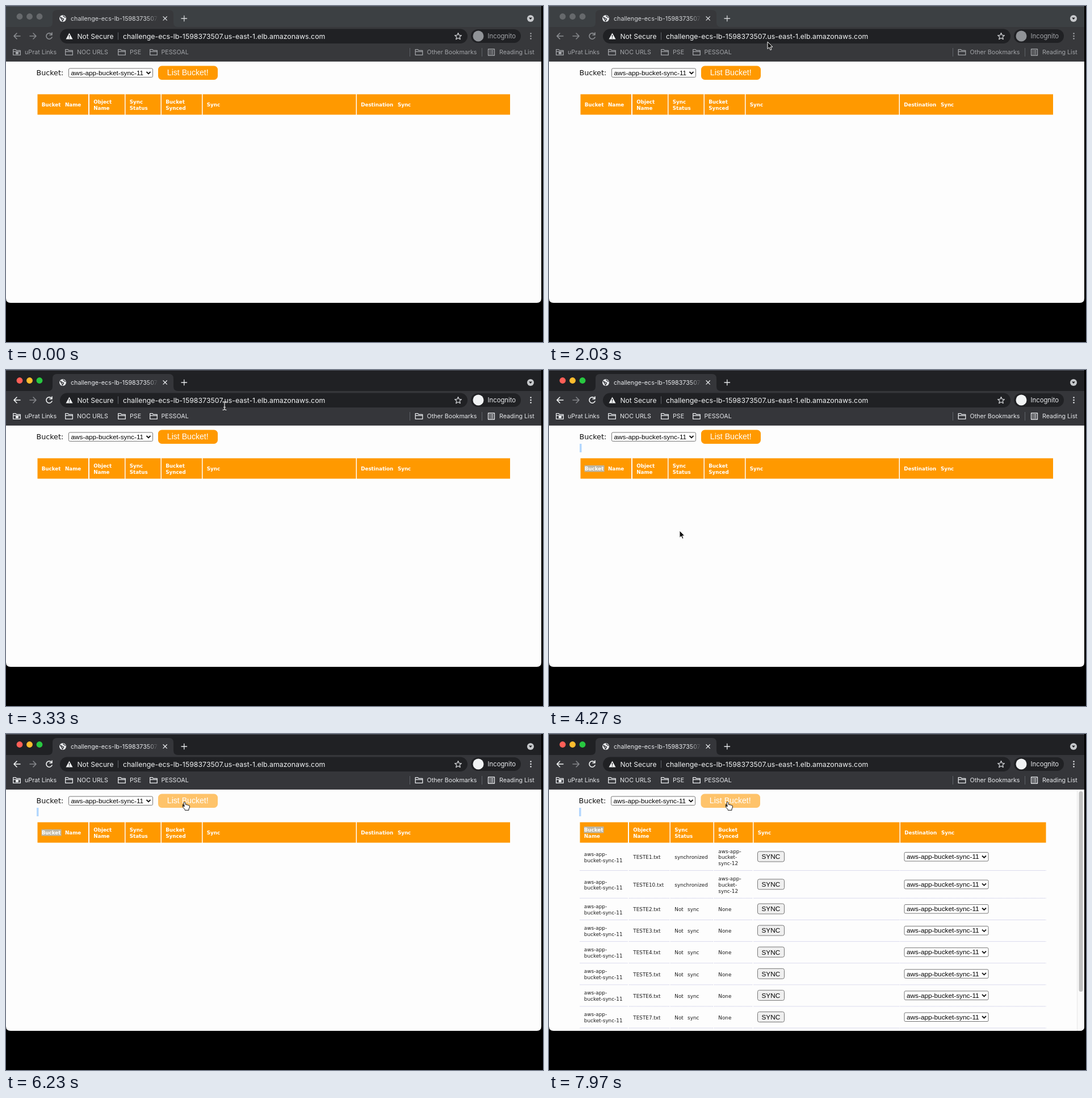
Recreate the animation shown at these times as an HTML page. Size 946 by 592 pixels, loop 8 s.

```html
<!DOCTYPE html>
<html lang="en">
<head>
<meta charset="utf-8">
<title>Bucket list</title>
<style>
  html, body { margin: 0; width: 100%; height: 100%; overflow: hidden; background: #000; }
  svg { display: block; width: 946px; height: 592px; }
  text { white-space: pre; }
  #browser { --frame: #202124; --bar: #35363a; --ink: #f1f3f4; --soft: #e8eaed; --back: #f1f3f4;
    --red: #ff5f57; --yellow: #febc2e; --green: #28c840; --badge: #f1f3f4; --title: #e8eaed; }
  #browser.inactive { --frame: #3c4043; --bar: #37383b; --soft: #a2a4a8; --back: #8c8e92;
    --red: #66696c; --yellow: #66696c; --green: #66696c; --badge: #909397; --title: #d4d6d9; }
  .ui { font-family: Inter, sans-serif; font-size: 10.7px; fill: var(--soft); }
  .url { font-size: 12.35px; fill: var(--ink); }
  .line { fill: none; stroke: var(--soft); stroke-width: 1.3; stroke-linecap: round; stroke-linejoin: round; }
  .label { font: 12.7px "DejaVu Sans", sans-serif; fill: #111; }
  .head { font: bold 8.75px "DejaVu Sans", sans-serif; fill: #fff; word-spacing: 4.5px; }
  .cell { font: 8.85px "DejaVu Sans", sans-serif; fill: #1c1c1c; word-spacing: 4.5px; }
  .form { font: 11.8px "Liberation Sans", Arial, sans-serif; fill: #000; }
  .button { font: 14.1px "Liberation Sans", Arial, sans-serif; fill: #fff; }
</style>
</head>
<body>
<svg viewBox="0 0 946 592">
  <defs>
    <clipPath id="window"><path d="M0 0H943V515Q943 523 935 523H8Q0 523 0 515Z"/></clipPath>
    <linearGradient id="fade" gradientUnits="userSpaceOnUse" x1="248" x2="268" y1="0" y2="0">
      <stop stop-color="#fff"/><stop offset="1" stop-color="#000"/>
    </linearGradient>
    <mask id="titleFade"><rect x="110" y="10" width="158" height="24" fill="url(#fade)"/></mask>
    <g id="folder"><path class="line" d="M.7 1.2H5l1.6 1.7h6.7v8H.7ZM.7 4.9h12.6"/></g>
  </defs>
  <rect width="946" height="592"/>
  <g clip-path="url(#window)">
    <rect width="943" height="523" fill="#fdfdfd"/>
    <g id="pages"></g>
    <g id="browser" class="inactive">
      <rect width="943" height="98" style="fill:var(--frame)"/>
      <rect width="943" height="1" fill="#50545f"/>
      <path d="M0 37H74Q82 37 82 29V15Q82 7 90 7H287Q295 7 295 15V29Q295 37 303 37H943V98H0Z" style="fill:var(--bar)"/>
      <rect y="97" width="943" height="1" fill="#48494d"/>
      <circle cx="24" cy="18.5" r="5.4" style="fill:var(--red)"/>
      <circle cx="41.5" cy="18.5" r="5.4" style="fill:var(--yellow)"/>
      <circle cx="59" cy="18.5" r="5.4" style="fill:var(--green)"/>
      <circle cx="100" cy="22" r="6" fill="#e8eaed"/>
      <path d="M95.5 19.5l4 2.5 2 1-2 3.5-1.5-3zM100.5 17l2 2 2.5 1.5" fill="none" stroke="#35363a" stroke-width="1.4"/>
      <text class="ui" x="114" y="26" mask="url(#titleFade)" style="fill:var(--title)">challenge-ecs-lb-1598373507.us</text>
      <path class="line" d="M277 18.7l6.4 6.4m0-6.4l-6.4 6.4M309 22h9.6m-4.8-4.8v9.6" style="stroke:var(--title)"/>
      <circle cx="924" cy="22" r="6" fill="#c6c8cb"/>
      <path d="M921 20.5h6l-3 3.5z" fill="#202124"/>

      <path class="line" d="M25 53H14m5-5l-5 5 5 5" style="stroke:var(--back);stroke-width:1.6"/>
      <path class="line" d="M42 53h11m-5-5l5 5-5 5" style="stroke:#85878b;stroke-width:1.6"/>
      <path class="line" d="M80.5 50.2A5.2 5.2 0 1 0 81 55M81 47v4h-4" style="stroke:var(--back);stroke-width:1.6"/>
      <rect x="95" y="40.5" width="718" height="25.5" rx="12.7" fill="#202124"/>
      <path d="M111.500 47.500l6 11h-12z" fill="#f1f3f4"/>
      <path d="M111.500 51v3.500m0 1.200v1.300" stroke="#202124" stroke-width="1.300"/>
      <text class="ui url" x="125.500" y="57.500" style="font-size:12.100px">Not Secure</text>
      <path d="M197.500 46.500v13" stroke="#5f6368"/>
      <text class="ui url" x="206" y="57.500">challenge-ecs-lb-1598373507.us-east-1.elb.amazonaws.com</text>
      <path class="line" d="M796.500 47.500l1.700 3.900 4.200.4-3.200 2.800 1 4.100-3.700-2.200-3.700 2.200 1-4.100-3.200-2.800 4.200-.4z" style="stroke:#d0d2d5"/>
      <rect x="819" y="41" width="88" height="24" rx="12" fill="#202124"/>
      <circle cx="832" cy="53" r="9.500" style="fill:var(--badge)"/>
      <text class="ui" x="848.500" y="57.300" style="font-size:11.300px">Incognito</text>
      <path d="M924.500 48.500v.01m0 4.500v.01m0 4.500v.01" stroke-width="2.600" stroke-linecap="round" style="stroke:var(--soft)"/>
      <g id="bookmarks"></g>
      <path d="M711.500 74v15M838.500 74v15" stroke="#5f6368"/>
      <path class="line" d="M849.500 76h11v11h-11zM852 79h1m2 0h3m-6 2.700h1m2 0h3m-6 2.700h1m2 0h3"/>
      <text class="ui" x="869" y="85">Reading List</text>
    </g>
  </g>
  <g id="pointer">
    <path id="arrow" d="M0 0V12.500L2.900 9.900 4.900 14.500 7 13.600 5.100 9.100H9Z" fill="#111" stroke="#fff" stroke-linejoin="round"/>
    <path id="beam" d="M-3.500-7.500Q0-7.500 0-5V5Q0 7.500-3.500 7.500M3.500-7.500Q0-7.500 0-5V5Q0 7.500 3.500 7.500M-2 2.500H2" fill="none" stroke="#e4e4e4" stroke-width="1.200"/>
    <path id="hand" d="M-1.500 1.200Q0-.8 1.400 1.200L2 5Q3.500 4.200 4.300 5.500 6 4.800 6.700 6.300 8.600 5.800 8.900 7.800L8.700 10.500 7.500 12.500V14.800H.8L.3 13-3 9.200Q-4-.2-.5 8.300-4.200 6.800-2.700 6.600L-.3 8Z" fill="#fff" stroke="#111" stroke-linejoin="round"/>
  </g>
</svg>
<script>
const LOOP = 8000, FOCUS = 2900, SELECT = 4220, HOVER = 4680, LISTED = 7720;
const ORANGE = '#ff9900', BUCKET = 'aws-app-bucket-sync-11';
const $ = id => document.getElementById(id);

const text = (cls, x, y, content) => `<text class="${cls}" x="${x}" y="${y}">${content}</text>`;
const rect = (x, y, w, h, fill, extra = '') =>
  `<rect x="${x}" y="${y}" width="${w}" height="${h}" fill="${fill}" ${extra}/>`;
const lines = (cls, x, centre, content) => content.split('|').map((part, i, all) =>
  text(cls, x, centre + 3.2 + (i - (all.length - 1) / 2) * 10.7, part)).join('');

const dropdown = (x, y) =>
  rect(x + .5, y + .5, 148, 15.5, '#fff', 'rx="2" stroke="#767676"') +
  text('form', x + 4.5, y + 12.2, BUCKET) +
  `<path d="M${x + 137.5} ${y + 6.5}l3.500 3.500 3.500-3.500" fill="none" stroke="#111" stroke-width="1.800"/>`;

const syncButton = y =>
  rect(367.5, y - 9.5, 47, 18, '#efefef', 'rx="3" stroke="#767676"') +
  text('form', 374.5, y + 3.8, 'SYNC');

// Each column is [left, right, heading].
function page(id, shift, columns) {
  const selection = rect(54 + shift, 130, 3.5, 15, '#b3d7fe') +
    rect(columns[0][0] + 7, columns[0][2].includes('|') ? 163 : 168, 35, 11.5, '#bdb6a4');
  return `<g id="${id}">` + text('label', 53.5 + shift, 122, 'Bucket:') +
    dropdown(110 + shift, 109.5) +
    '<g class="list">' + rect(268 + shift / 2, 105.5, 105 + shift / 2, 24.5, ORANGE, 'rx="6.500"') + '</g>' +
    text('button', 283.8 + shift, 122.3, 'List Bucket!') +
    columns.map(([left, right]) => rect(left, 155.5, right - left, 36, ORANGE)).join('') +
    `<g class="selection">${selection}</g>` +
    columns.map(([left, , title]) => lines('head', left + 7.2, 174, title)).join('');
}

function row(index, columns) {
  const synced = index < 2;
  const centre = synced ? 217 + index * 48.8 : 309 + (index - 2) * 38.1;
  const bottom = centre + (synced ? 23.5 : 18.5);
  const name = `TESTE${[1, 10, 2, 3, 4, 5, 6, 7][index]}.txt`;
  const values = ['aws-app-|bucket-sync-11', name, synced ? 'synchronized' : 'Not sync',
    synced ? 'aws-app-|bucket-|sync-12' : 'None'];
  return values.map((value, i) => lines('cell', columns[i][0] + 7.3, centre, value)).join('') +
    syncButton(centre - .5) + dropdown(625.5, centre - 9) +
    columns.map(([left, right]) =>
      `<path d="M${left} ${bottom}H${right}" stroke="#b9b9de" stroke-dasharray="1 1"/>`).join('');
}

const emptyColumns = [[55.5, 145, 'Bucket Name'], [147, 209, 'Object|Name'], [210.5, 272.5, 'Sync|Status'],
  [274, 345, 'Bucket|Synced'], [346.5, 616.5, 'Sync'], [618, 888, 'Destination Sync']];
const listColumns = [[54.5, 139, 'Bucket|Name'], [141, 212.5, 'Object|Name'], [214, 289.5, 'Sync|Status'],
  [291, 359, 'Bucket|Synced'], [360.5, 617.5, 'Sync'], [619, 875.5, 'Destination Sync']];

$('pages').innerHTML = page('empty', 0, emptyColumns) + '</g>' +
  page('listed', -1, listColumns) +
  Array.from({ length: 8 }, (_, i) => row(i, listColumns)).join('') +
  rect(930, 98, 13, 425, '#fafafa') + rect(930, 98, 1, 425, '#e8e8e8') +
  rect(933.5, 101, 7, 353, '#c1c1c1', 'rx="3.500"') + '</g>';

$('bookmarks').innerHTML = [[12, 33, 'uPrat Links'], [104, 125, 'NOC URLS'], [197, 218, 'PSE'],
  [253, 273.5, 'PESSOAL'], [720.5, 741.5, 'Other Bookmarks']].map(([icon, x, name]) =>
  `<use href="#folder" x="${icon}" y="75.500"/>` + text('ui', x, 85, name)).join('') +
  '<path d="M17 80h5v5h-5z" style="fill:var(--soft)"/>';

// Pointer hot spots: [time, x, y].
const route = [[1450, 760, 0], [1950, 385, 63], [3400, 385, 63], [3950, 230, 283],
  [4300, 230, 283], [4850, 336.5, 113.5], [5150, 336.5, 113.5], [5800, 314.5, 119.5], [LOOP, 314.5, 119.5]];

function pointerAt(time) {
  const next = Math.max(1, route.findIndex(stop => stop[0] > time));
  const [t0, x0, y0] = route[next - 1], [t1, x1, y1] = route[next];
  const p = Math.min(1, Math.max(0, (time - t0) / (t1 - t0)));
  const eased = p * p * (3 - 2 * p);
  return [x0 + (x1 - x0) * eased, y0 + (y1 - y0) * eased];
}

const show = (element, visible) => element.style.display = visible ? '' : 'none';

function draw(time) {
  const [x, y] = pointerAt(time);
  const hand = time >= HOVER;
  const beam = time >= FOCUS && y < 67;
  $('browser').classList.toggle('inactive', time < FOCUS);
  show($('empty'), time < LISTED);
  show($('listed'), time >= LISTED);
  document.querySelectorAll('.selection').forEach(el => show(el, time >= SELECT));
  document.querySelectorAll('.list').forEach(el => el.style.opacity = hand ? .58 : 1);
  show($('pointer'), time >= route[0][0]);
  $('pointer').setAttribute('transform', `translate(${x} ${y})`);
  show($('hand'), hand);
  show($('beam'), beam);
  show($('arrow'), !hand && !beam);
}

const start = performance.now();
function tick() {
  draw((performance.now() - start) % LOOP);
  requestAnimationFrame(tick);
}
tick();
</script>
</body>
</html>
```
